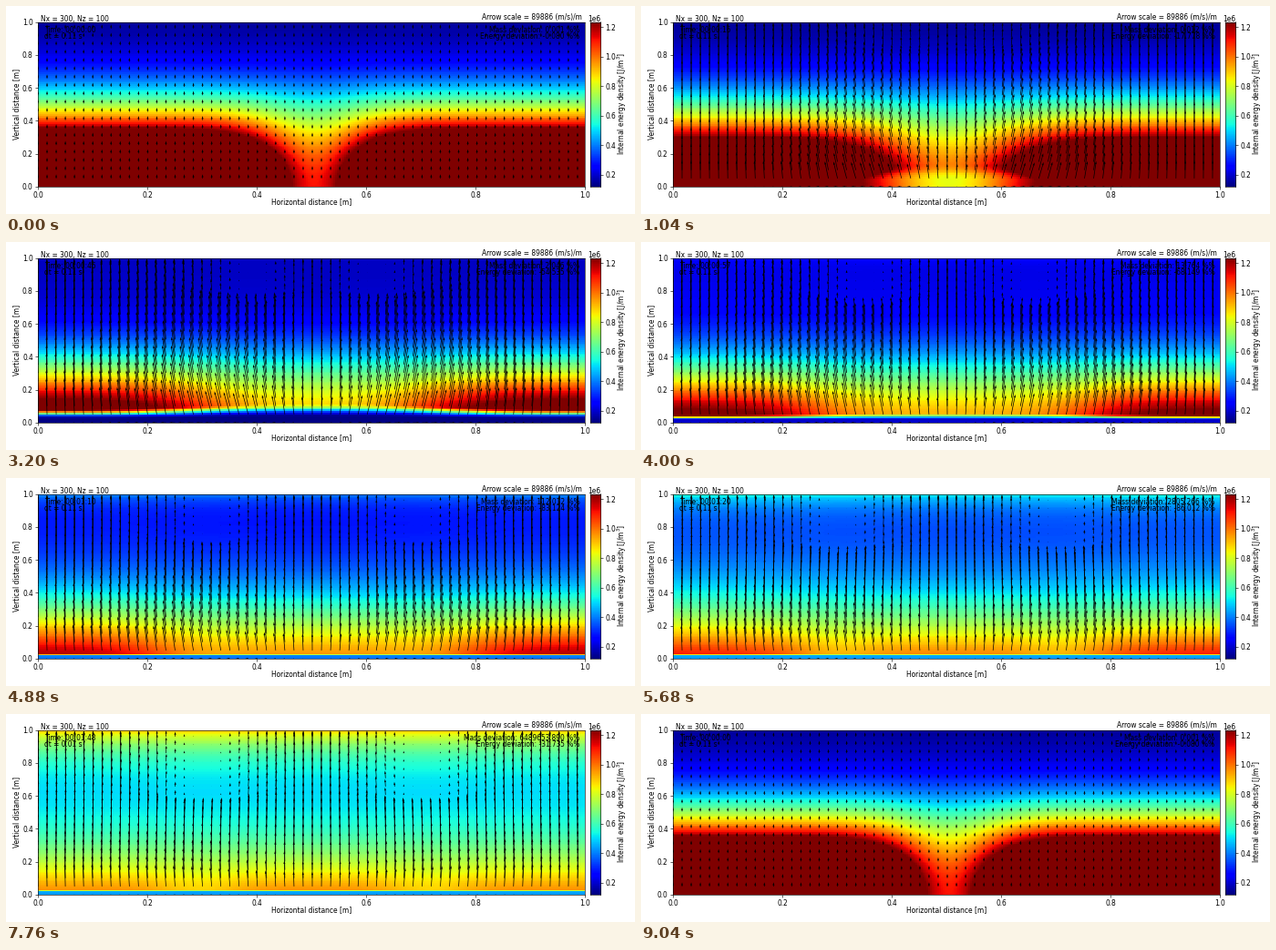
A matplotlib script for the animation above (9120 ms loop, 690x229 px).

```python
import numpy as np
import matplotlib.pyplot as plt
from matplotlib.animation import FuncAnimation

W, H, DPI = 690, 229, 100
FRAMES, STEP = 114, 80
L, T, R, B = 35, 17.5, 635, 199
NX, NZ = 300, 100
CENTRE = .505
S = 0.542  # scale of the default text and line sizes

plt.rcParams.update({
    "font.family": "DejaVu Sans", "font.size": 10 * S,
    "axes.linewidth": 0.8 * S,
    "xtick.major.width": 0.8 * S, "ytick.major.width": 0.8 * S,
    "xtick.major.size": 3.5 * S, "ytick.major.size": 3.5 * S,
    "xtick.major.pad": 3.5 * S, "ytick.major.pad": 3.5 * S,
})

# Readouts at a few moments, interpolated in between
MOMENTS = [0, 61, 81, 97, 112]
CLOCK = [0, 70, 91, 108, 124]
LOG_MASS = np.log10([.001, 112.012, 70256.038, 6489653.890, 3.9e8])
ENERGY = [-.080, -83.124, -88.901, -31.735, 24.6]

x = np.linspace(0, 1, NX)
z = np.linspace(0, 1, NZ)[:, None]
ax_x, ax_z = np.meshgrid(x[::5], z[::5, 0])


def ease(t):
    t = np.clip(t, 0, 1)
    return t * t * (3 - 2 * t)


def field(n):
    # Warm fluid below, slowly cooling, and heat gathering at the lid
    heat = 1.9 * np.exp(-n / 75)
    depth = .34 + .10 * (1 - ease((n - 22) / 25))
    power = 1.9 - .5 * ease((n - 40) / 35)
    lid = max(n - 45, 0)
    side = (.01 + .0033 * max(n - 25, 0)
            + heat * np.exp(-(z / depth) ** power)
            + .0085 * lid * np.exp((z - 1) / (.01 + .003 * lid)))

    # The plume is a damped copy of the surroundings and widens with time
    mid = side / (1 + .6 * (1 - ease((n - 25) / 70)) * side)
    d = np.abs(x - CENTRE)
    width = min(.12 + .0033 * n, .32)
    plume = np.exp(-(d / width) ** (2 + 2 * ease((n - 25) / 35)))
    temp = side + (mid - side) * plume
    ring = np.exp(-((d - .21) / .08) ** 2) * np.exp(-z / .12)
    temp = temp - .09 * ease((n - 45) / 30) * ring

    # Cold layer on the floor
    floor = temp * (1 - ease(n / 42)) + .28 * ease((n - 42) / 25)
    thin = 1 - ease((n - 32) / 26)
    end = .028 + .07 * thin * (1 + .6 * plume)
    return floor + (temp - floor) * ease((z / end - .3) / .7)


def flow(n):
    start, late = ease(n / 25), ease((n - 50) / 35)
    rise = 4.6 + start * (30 - .1 * n)
    drift = 11 * start * np.exp(-max(n - 25, 0) / 40)
    d = ax_x - CENTRE

    # Still zones near the top, one on each side of the plume
    gap = .08 + .12 * ease((n - 25) / 45)
    still = np.exp(-((np.abs(d) - gap) / .11) ** 2)
    moving = 1 - start * still * ease((ax_z - .74 + .003 * n) / .12)

    q = d / (.13 + .08 * ease(n / 65))
    fade = (1 - late) * np.exp(-ax_z / .7) + late * np.cos(np.pi * ax_z / .7)
    u = drift * q * np.exp(.5 - .5 * q * q) * fade * moving
    slow = 1 - .5 * start * np.exp(-(d / .2) ** 2 - ax_z / .15)
    v = np.minimum(rise * moving * slow, .9 * (B - T) * (1 - ax_z))
    return u * (ax_z < 1), np.where(ax_z == 0, 0, v)


def box(l, t, r, b):
    return fig.add_axes([l / W, 1 - b / H, (r - l) / W, (b - t) / H])


def label(px, py, s, ha="left", va="baseline", **kw):
    return fig.text(px / W, 1 - py / H, s, ha=ha, va=va, color="black", **kw)


fig = plt.figure(figsize=(W / DPI, H / DPI), dpi=DPI, facecolor="white")

ax = box(L, T, R, B)
img = ax.imshow(field(0), cmap="jet", vmin=0, vmax=1, origin="lower",
                extent=(0, 1, 0, 1), aspect="auto", interpolation="nearest")
arrows = ax.quiver(ax_x, ax_z, *flow(0), angles="uv", units="dots", width=.7,
                   scale_units="dots", scale=1, minlength=0, color="black")
ax.set(xlim=(0, 1), ylim=(0, 1), xticks=np.arange(0, 1.1, .2),
       yticks=np.arange(0, 1.1, .2))

bar = box(640.5, T, 652, B)
bar.imshow(np.linspace(0, 1, 256)[:, None], cmap="jet", origin="lower",
           extent=(0, 1, .12, 1.234), aspect="auto")
bar.set_xticks([])
bar.yaxis.tick_right()
bar.set_yticks(np.arange(.2, 1.3, .2))

label(335, 215.5, "Horizontal distance [m]", "center", "center")
label(11.5, 108, "Vertical distance [m]", "center", "center", rotation=90)
label(676, 108, "Internal energy density [J/m$^3$]", "center", "center", rotation=90)
label(638, 16.6, "1e6")
label(38, 16.8, "Nx = 300, Nz = 100")
label(631.5, 14.8, "Arrow scale = 89886 (m/s)/m", "right")
clock = label(42, 28.7, "")
dt = label(42, 35.6, "")
mass = label(629.5, 28.7, "", "right")
energy = label(629.5, 35.6, "", "right")


def draw(i):
    n = i % (FRAMES - 1)
    img.set_data(field(n))
    arrows.set_UVC(*flow(n))
    sec = int(round(np.interp(n, MOMENTS, CLOCK)))
    clock.set_text(f"Time: 00:{sec // 60:02d}:{sec % 60:02d}")
    dt.set_text(f"dt = {0.11 if n < 90 else 0.01:.2f} s")
    mass.set_text(f"Mass deviation: {10 ** np.interp(n, MOMENTS, LOG_MASS):.3f} %%")
    energy.set_text(f"Energy deviation: {np.interp(n, MOMENTS, ENERGY):.3f} %%")
    return img, arrows, clock, dt, mass, energy


anim = FuncAnimation(fig, draw, frames=FRAMES, interval=STEP, repeat=True,
                     repeat_delay=0, blit=False)
plt.show()
```
